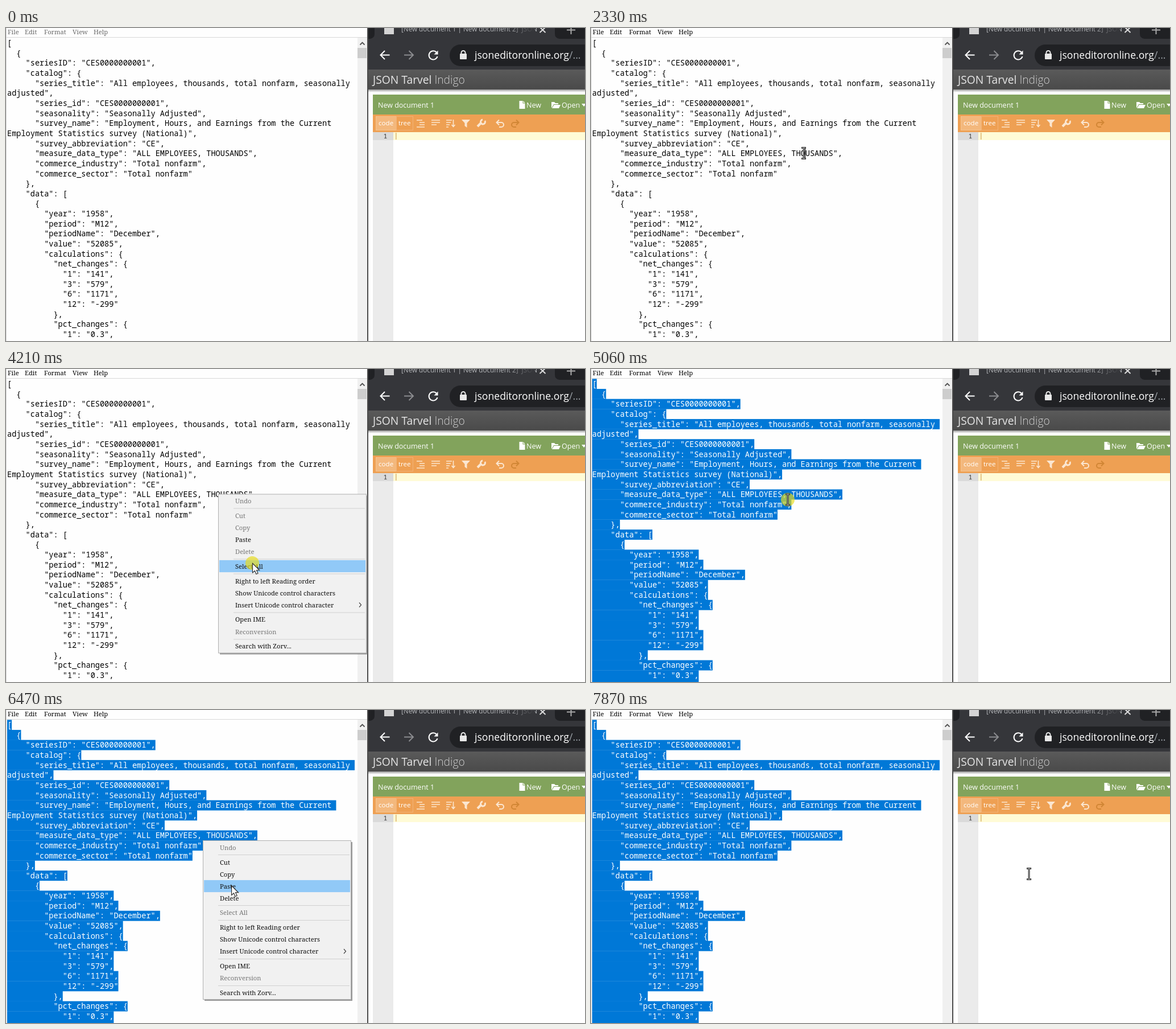
These frames come from a looping animation (1018 px wide and 550 px high, 8000 ms). An HTML page:

```html
<!DOCTYPE html>
<html lang="en">
<head>
<meta charset="utf-8">
<style>
html, body { margin: 0; width: 100%; height: 100%; overflow: hidden; background: #fff; }
svg { display: block; }
text { white-space: pre; }
.mono { font-family: "Noto Sans Mono", monospace; }
.sans { font-family: "Open Sans", sans-serif; fill: #fff; }
.serif { font-family: "Noto Serif", serif; font-size: 11.2px; font-weight: 500; }
#doc { font-size: 13.58px; }
#doc rect { fill: #0078d7; visibility: hidden; }
#doc.selected { fill: #fff; }
#doc.selected rect { visibility: visible; }
.icon { fill: none; stroke: #fff; stroke-width: 2; }
</style>
</head>
<body>
<svg id="stage" width="1018" height="550" viewBox="0 0 1018 550">
  <defs>
    <linearGradient id="header" x2="0" y2="1"><stop stop-color="#5a5a5a"/><stop offset="1" stop-color="#4a4a4a"/></linearGradient>
    <linearGradient id="fade" x2="1" y2="0"><stop stop-color="#35363a" stop-opacity="0"/><stop offset="1" stop-color="#35363a"/></linearGradient>
    <linearGradient id="below" x2="0" y2="1"><stop stop-color="#999"/><stop offset="1" stop-color="#fff"/></linearGradient>
  </defs>

  <!-- text editor window -->
  <rect width="636" height="550" fill="#fefefe"/>
  <path d="M.5 0V550M0 16.5H635" stroke="#d8d8d8"/>
  <g id="menubar" class="serif"></g>
  <g id="doc" class="mono"></g>
  <rect id="caret" x="376" y="212" width="1" height="16"/>
  <rect x="618" y="17" width="17" height="533" fill="#f0f0f0"/>
  <rect x="618" y="35" width="16" height="18" fill="#cdcdcd"/>
  <path d="M622.5 29.5L626.5 25.5L630.5 29.5" fill="none" stroke="#505050" stroke-width="1.8"/>

  <!-- browser window -->
  <rect x="637" width="381" height="73" fill="#35363a"/>
  <path d="M637 0H648V10Q648 18 640 19H637ZM965 0H1018V19H973Q965 18 965 10Z" fill="#202124"/>
  <rect x="665" width="17" height="11" fill="#d4d4d4"/>
  <text class="sans" x="695" y="6" font-size="11.7" style="fill:#b5b7ba">[New document 1 | New document 2]  JSON</text>
  <rect x="880" width="50" height="14" fill="url(#fade)"/>
  <path d="M938.5 -1.5L948.5 8M948.5 -1.5L938.5 8" class="icon" style="stroke:#ddd"/>
  <path d="M986 3.5H1001M993.5 -4V11" class="icon" style="stroke:#aaa"/>
  <path d="M674.5 47.5H659M666 40L658.5 47.5L666 55" class="icon"/>
  <path d="M700 47.5H715.5M708.5 40L716 47.5L708.5 55" class="icon" style="stroke:#8b8c8f"/>
  <path d="M757 43A7.6 7.6 0 1 0 758.5 50" class="icon"/>
  <path d="M759.5 39.5V46.5H752.5Z" fill="#fff"/>
  <path d="M1018 29H799A19 19 0 0 0 799 67H1018Z" fill="#202124"/>
  <rect x="798" y="45" width="12" height="10" rx="1" fill="#e8e8e8"/>
  <path d="M800.5 45V43.5A3.5 3.5 0 0 1 807.5 43.5V45" class="icon" style="stroke:#e8e8e8"/>
  <text class="sans" x="824" y="54" font-size="17.6">jsoneditoronline.org<tspan fill="#9aa0a6">/...</tspan></text>

  <rect x="637" y="73" width="381" height="35" fill="url(#header)"/>
  <rect x="637" y="108" width="381" height="5" fill="url(#below)"/>
  <text class="sans" x="645" y="98" font-size="19.3" style="fill:#e6e6e6">JSON Tarvel <tspan font-weight="300" fill="#d0d0d0">Indigo</tspan></text>

  <rect x="645" y="117" width="373" height="35" fill="#82a35c"/>
  <g class="sans" font-size="12.5">
    <text x="654" y="140">New document 1</text>
    <text x="915" y="140">New</text>
    <text x="977" y="140">Open</text>
  </g>
  <path d="M902.5 128H908.5V132.5H912.5V142H902.5ZM909.5 128L912.5 131.5H909.5Z" fill="#fff"/>
  <path d="M959 140V130H964L966 132H971V134H963L959.5 140ZM963.5 135H975L972 141H960Z" fill="#fff"/>
  <path d="M1012 133H1020L1016 138Z" fill="#fff"/>

  <rect x="645" y="152" width="373" height="31" fill="#eea053"/>
  <rect x="650.5" y="155.5" width="36" height="24" fill="#f3b87d" stroke="#f5c592"/>
  <rect x="686.5" y="155.5" width="29" height="24" fill="none" stroke="#f2b377"/>
  <g class="sans" font-size="11.6">
    <text x="655" y="171">code</text>
    <text x="690" y="171">tree</text>
  </g>
  <g class="icon" style="stroke:#fbe6d0;stroke-width:1.6">
    <path d="M722 162H732M727 166H736M727 170H736M722 174H736"/>
    <path d="M748 162H763M748 166H763M748 170H757"/>
    <path d="M774 162H784M774 166H782M774 170H780M774 174H778M786.5 161V173M783.5 170L786.5 173.5L789.5 170"/>
    <path d="M801 161H816L810.5 167V175L806.5 172V167Z" fill="#fbe6d0" stroke="none"/>
    <path d="M829 173L836 166" stroke-width="4"/>
    <path d="M842 163A4 4 0 1 1 838 161" stroke-width="3"/>
    <path id="undo" d="M863 166H871A4 4 0 0 1 871 174H867M867 161.5L862.5 166L867 170.5" stroke-width="2"/>
    <path d="M901 166H893A4 4 0 0 0 893 174H897M897 161.5L901.5 166L897 170.5" stroke="#d18635" stroke-width="2"/>
  </g>

  <rect x="645" y="183" width="36" height="367" fill="#ebebeb"/>
  <rect x="645" y="183" width="36" height="14" fill="#dadada"/>
  <rect x="681" y="183" width="337" height="14" fill="#fffbd6"/>
  <text class="mono" x="663.5" y="194" font-size="11.5" fill="#333">1</text>
  <rect x="685" y="184" width="1.5" height="12" fill="#dcb56e"/>
  <rect x="635" width="2" height="550" fill="#4b4b4b"/>

  <g id="menus"></g>
  <circle id="click" r="12" fill="#e8dc1e" opacity=".68"/>
  <g id="pointer">
    <path id="arrow" d="M.5 .5V17L4.5 13.5L7 19.5L10 18L7.5 12.5H12.5Z" fill="#fff" stroke="#333" stroke-width="1.2"/>
    <g id="ibeam" fill="none">
      <path d="M-4 -9.5H4M-4 9.5H4M0 -9.5V9.5" stroke="#333" stroke-width="3"/>
      <path d="M-3 -9.5H3M-3 9.5H3M0 -9.5V9.5" stroke="#ccc" stroke-width=".8"/>
    </g>
  </g>
</svg>
<script>
const $ = id => document.getElementById(id);
const CHAR = 8.147, ROW = 17.655;

function add(parent, tag, attrs, content) {
  const node = document.createElementNS("http://www.w3.org/2000/svg", tag);
  for (const key in attrs) node.setAttribute(key, attrs[key]);
  if (content) node.textContent = content;
  return parent.appendChild(node);
}
const show = (node, on) => node.style.visibility = on ? "visible" : "hidden";

const documentText = `[
  {
    "seriesID": "CES0000000001",
    "catalog": {
      "series_title": "All employees, thousands, total nonfarm, seasonally${" "}
adjusted",
      "series_id": "CES0000000001",
      "seasonality": "Seasonally Adjusted",
      "survey_name": "Employment, Hours, and Earnings from the Current${" "}
Employment Statistics survey (National)",
      "survey_abbreviation": "CE",
      "measure_data_type": "ALL EMPLOYEES, THOUSANDS",
      "commerce_industry": "Total nonfarm",
      "commerce_sector": "Total nonfarm"
    },
    "data": [
      {
        "year": "1958",
        "period": "M12",
        "periodName": "December",
        "value": "52085",
        "calculations": {
          "net_changes": {
            "1": "141",
            "3": "579",
            "6": "1171",
            "12": "-299"
          },
          "pct_changes": {
            "1": "0.3",
            "3": "1.1",`;

documentText.split("\n").forEach((line, i) => {
  add($("doc"), "rect", { x: 2, y: 17.3 + i * ROW, width: line.length * CHAR, height: ROW + .3 });
});
documentText.split("\n").forEach((line, i) => {
  add($("doc"), "text", { x: 2, y: 31 + i * ROW }, line);
});
[["File", 3], ["Edit", 33], ["Format", 67], ["View", 117], ["Help", 154]].forEach(([label, x]) =>
  add($("menubar"), "text", { x, y: 11 }, label));

// Context menu: label and vertical centre of each item
const items = [["Undo", 12.5], ["Cut", 38.5], ["Copy", 59.5], ["Paste", 80.5], ["Delete", 101.5],
  ["Select All", 127], ["Right to left Reading order", 153], ["Show Unicode control characters", 174],
  ["Insert Unicode control character", 195], ["Open IME", 220.5], ["Reconversion", 242], ["Search with Zorv...", 267.5]];

function createMenu(x, y, opens, closes, disabled) {
  const node = add($("menus"), "g", { class: "serif", transform: `translate(${x} ${y})` });
  add(node, "rect", { x: 3, y: 3, width: 260, height: 279, fill: "#777", opacity: .75 });
  add(node, "rect", { x: .5, y: .5, width: 260, height: 279, fill: "#f1f1f1", stroke: "#b0b0b0" });
  const bar = add(node, "rect", { x: 2, width: 257, height: 21.2, fill: "#91c9f7" });
  add(node, "path", { d: [25, 114, 140, 208, 255].map(v => `M27 ${v + .5}H258`).join(""), stroke: "#d0d0d0" });
  for (const [label, cy] of items)
    add(node, "text", { x: 30, y: cy + 4, fill: disabled.includes(label) ? "#777" : "#111" }, label);
  add(node, "path", { d: "M248 191L251.5 195L248 199", fill: "none", stroke: "#444", "stroke-width": 1.2 });
  return { node, bar, y, opens, closes, enabled: items.filter(([label]) => !disabled.includes(label)) };
}
const menus = [
  createMenu(373, 219.5, 3050, 4280, ["Undo", "Cut", "Copy", "Delete", "Reconversion"]),
  createMenu(346, 229, 5120, 6930, ["Undo", "Select All", "Reconversion"])
];

// Pointer path: time, x, y
const path = [[450, 967, 541], [640, 880, 420], [850, 690, 290], [1040, 570, 235], [1230, 511, 220],
  [1310, 478, 212], [1390, 444, 210], [1550, 395, 216], [1770, 374, 220], [3260, 374, 220],
  [3410, 385, 242], [3570, 410, 295], [3730, 422, 317], [3890, 428, 330], [4050, 433, 341], [4210, 433, 341],
  [4500, 405, 290], [4750, 360, 242], [4970, 346, 229.5], [5360, 346, 229.5], [5600, 362, 255], [5900, 385, 305],
  [6230, 395, 345], [6310, 397, 359], [6390, 397, 334], [6470, 396, 306], [6550, 395, 291], [6630, 395, 286.5],
  [6870, 395, 286.5], [7050, 460, 298], [7300, 650, 300], [7500, 765, 290], [7640, 796, 288], [7720, 796, 288], [7870, 770, 288]];
const clicks = [[2240, 2330], [3010, 3250], [4210, 4370], [5060, 5290], [6790, 6930]];

function pointerAt(t) {
  const next = path.findIndex(point => point[0] > t);
  if (next < 0) return path[path.length - 1].slice(1);
  if (next === 0) return path[0].slice(1);
  const [t0, x0, y0] = path[next - 1], [t1, x1, y1] = path[next];
  const k = (t - t0) / (t1 - t0);
  return [x0 + (x1 - x0) * k, y0 + (y1 - y0) * k];
}

function draw(t) {
  const sampled = 450 + Math.floor((t - 430) / 78.1) * 78.1;
  const [x, y] = pointerAt(sampled);
  const focused = t >= 2240;

  $("menubar").setAttribute("fill", focused ? "#000" : "#6a6a6a");
  $("doc").classList.toggle("selected", t >= 4280);
  show($("caret"), focused && t < 2780);

  let menuOpen = false;
  for (const menu of menus) {
    const open = t >= menu.opens && t < menu.closes;
    menuOpen = menuOpen || open;
    menu.node.style.display = open ? "" : "none";
    menu.node.style.opacity = Math.min(1, (t - menu.opens) / 150);
    const hovered = menu.enabled.find(([, cy]) => Math.abs(y - menu.y - cy) < 10.6);
    show(menu.bar, hovered);
    if (hovered) menu.bar.setAttribute("y", hovered[1] - 10.6);
  }

  const arrow = menuOpen || (x > 618 && x < 681);
  show($("arrow"), t >= 450 && arrow);
  show($("ibeam"), t >= 450 && !arrow);
  $("pointer").setAttribute("transform", `translate(${x} ${y})`);
  $("click").setAttribute("transform", `translate(${x} ${y})`);
  show($("click"), clicks.some(([from, to]) => t >= from && t < to));
}

function tick() {
  draw(performance.now() % 8000);
  requestAnimationFrame(tick);
}
tick();
</script>
</body>
</html>
```
